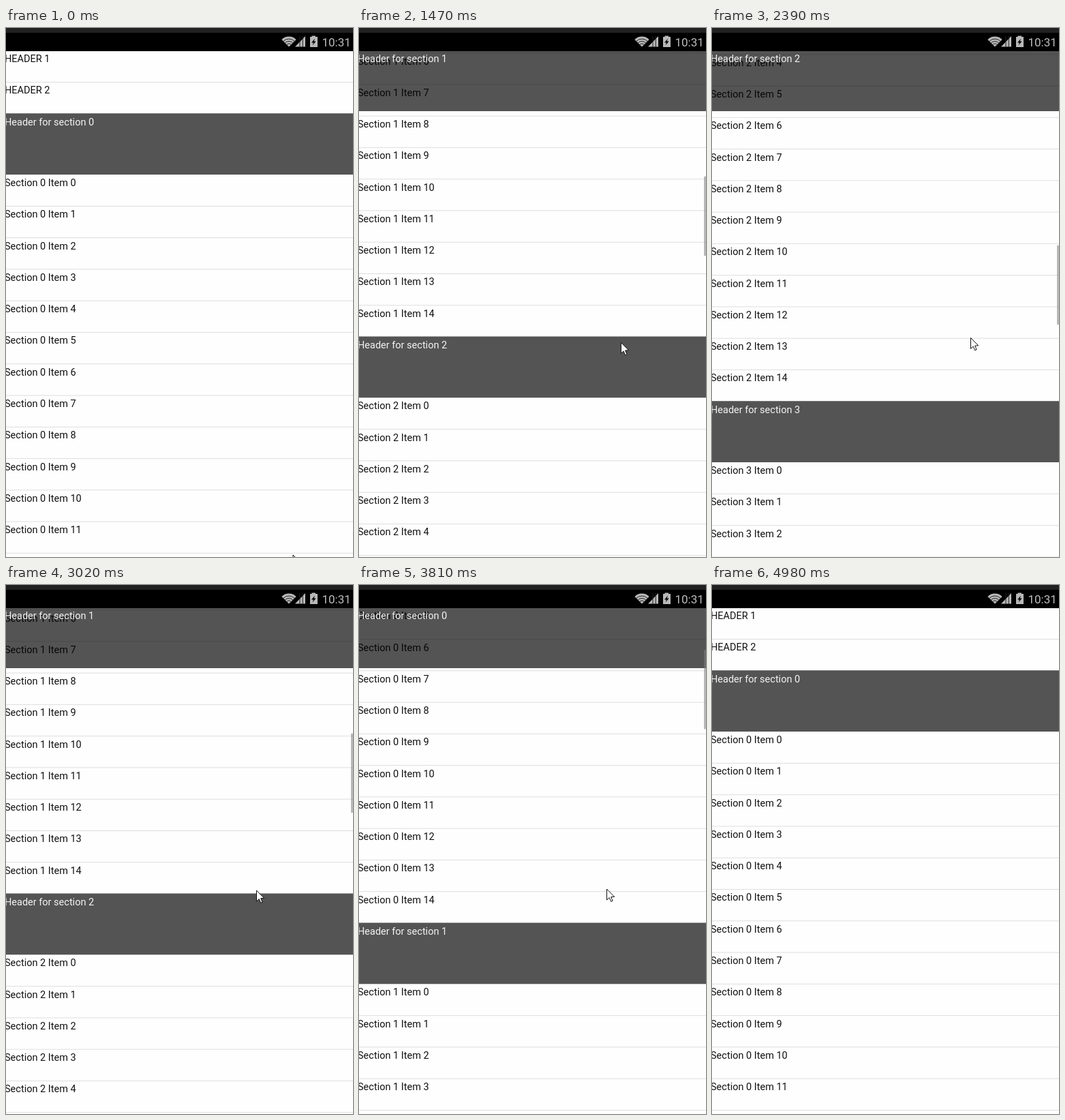
Animation of 509x776 px, one loop 5670 ms. Source, as an HTML page with a canvas:

```html
<!DOCTYPE html>
<html lang="en">
<head>
<meta charset="utf-8">
<title>Sticky section headers</title>
<style>
  html, body { margin: 0; width: 100%; height: 100%; overflow: hidden; background: #fff; }
  canvas { display: block; }
</style>
</head>
<body>
<canvas id="stage" width="509" height="776"></canvas>
<script>
const ctx = document.getElementById('stage').getContext('2d');
const W = 509, H = 776, LOOP = 5670;
const TOP = 33.5, ROW = 46.27, HEAD = 88.5, HEAD_STEP = 89.4, ITEMS = 15;
const FIRST = TOP + 2 * ROW;
const SECTION = HEAD_STEP + ITEMS * ROW;
const NOTCH = 137.74, TICK = 80;
const FADE_START = 4430, FADE_TIME = 250;

// Turns of the wheel: start, number of ticks, notch reached
const turns = [
  [750, 4, 4], [1080, 1, 8], [1400, 2, 10], [2010, 4, 16], [2310, 3, 13],
  [2630, 3, 10], [3020, 2, 8], [3340, 2, 5], [3720, 2, 3], [4040, 2, 0]
];

// Key points of the pointer tip: time, x, y
const path = [
  [0, 421, 773], [280, 391, 478], [670, 388.5, 466], [990, 388.5, 466], [1260, 385.5, 463],
  [2380, 379.5, 454.5], [3010, 367.5, 448], [3570, 363.5, 446], [4430, 363.5, 446], [4970, 421, 785]
];

const mix = (a, b, k) => a + (b - a) * k;
const clamp = k => Math.min(1, Math.max(0, k));

function notchAt(t) {
  let notch = 0;
  for (const [start, ticks, target] of turns) {
    if (t < start) break;
    const done = Math.floor((t - start) / TICK) + 1;
    notch = Math.round(mix(notch, target, clamp(done / ticks)));
  }
  return notch;
}

function pointerAt(time) {
  const t = Math.floor(time / 70) * 70;
  const i = path.findIndex(key => key[0] > t);
  if (i < 0) return path[path.length - 1].slice(1);
  const [t0, x0, y0] = path[i - 1], [t1, x1, y1] = path[i];
  const k = (t - t0) / (t1 - t0);
  return [mix(x0, x1, k), mix(y0, y1, k)];
}

function rect(x, y, w, h, color) {
  ctx.fillStyle = color;
  ctx.fillRect(x, y, w, h);
}

function shape(points, color) {
  ctx.beginPath();
  points.forEach(([x, y]) => ctx.lineTo(x, y));
  ctx.closePath();
  ctx.fillStyle = color;
  ctx.fill();
}

function label(text, top, color) {
  ctx.font = '14.5px Roboto, sans-serif';
  ctx.fillStyle = color;
  ctx.fillText(text, -2, top + 16.7);
}

function row(text, top, divided = true) {
  if (top > H || top + ROW < TOP) return;
  label(text, top, '#111');
  if (divided) rect(0, top + ROW - 0.8, W, 1, '#dedede');
}

function sectionHeader(section, top, height) {
  if (top > H || top + HEAD < 0) return;
  rect(0, top - 0.8, W, height + 0.8, 'rgba(0,0,0,0.667)');
  label('Header for section ' + section, top, '#f4f4f4');
}

function list(scroll) {
  row('HEADER 1', TOP - scroll);
  row('HEADER 2', TOP + ROW - scroll, false);
  let pinned = -1;
  for (let s = 0; s < 6; s++) {
    const top = FIRST + s * SECTION - scroll;
    if (top < TOP) pinned = s;
    else sectionHeader(s, top, HEAD + 0.5);
    for (let i = 0; i < ITEMS; i++) {
      row(`Section ${s} Item ${i}`, top + HEAD_STEP + i * ROW, i < ITEMS - 1);
    }
  }
  if (pinned >= 0) {
    const next = FIRST + (pinned + 1) * SECTION - scroll;
    sectionHeader(pinned, Math.min(TOP, next - HEAD), HEAD);
  }
}

// Row index, with fraction, at a distance from the top of the content
function rowIndex(y) {
  if (y < 2 * ROW) return y / ROW;
  const inner = y - 2 * ROW;
  const section = Math.floor(inner / SECTION);
  const rest = inner - section * SECTION;
  const part = rest < HEAD_STEP ? rest / HEAD_STEP : 1 + (rest - HEAD_STEP) / ROW;
  return 2 + section * (ITEMS + 1) + part;
}

function scrollbar(scroll, t) {
  if (t < turns[0][0]) return;
  const from = rowIndex(scroll), to = rowIndex(scroll + H - TOP);
  ctx.globalAlpha = 1 - clamp((t - FADE_START) / FADE_TIME);
  rect(506, 37 + 7.25 * from, 3, 7.7 * (to - from), 'rgba(127,127,127,0.55)');
  ctx.globalAlpha = 1;
}

function wifi(x, y, color) {
  const fan = r => ctx.arc(x, y, r, -Math.PI * 0.75, -Math.PI * 0.25);
  ctx.beginPath();
  ctx.moveTo(x, y);
  fan(15);
  ctx.fillStyle = color;
  ctx.fill();
  ctx.strokeStyle = '#222';
  ctx.lineWidth = 1;
  for (let r = 4.5; r < 15; r += 3.5) {
    ctx.beginPath();
    fan(r);
    ctx.stroke();
  }
}

function statusBar() {
  const grey = '#b9b9b9';
  rect(0, 0, W, 34, '#000');
  rect(0, 0, W, 7, '#212121');
  wifi(415, 27.5, grey);

  // signal
  shape([[424, 27.5], [439, 27.5], [439, 12]], grey);
  rect(430.5, 12, 1, 16, '#222');
  rect(434.7, 12, 1, 16, '#222');

  // charging battery
  rect(448.5, 11.5, 5.5, 3, grey);
  rect(446, 13, 11, 15, grey);
  shape([[453, 15.5], [448, 21.5], [451, 21.5], [449.5, 25.5], [454.7, 19.5], [451.7, 19.5]], '#000');

  ctx.font = '17px Roboto, sans-serif';
  ctx.fillStyle = '#bdbdbd';
  ctx.fillText('10:31', 463.5, 26.6);
}

function pointer(x, y) {
  ctx.save();
  ctx.translate(x, y);
  shape([[0, 0], [0, 16], [3.7, 12.6], [6.2, 18.3], [8.6, 17.3], [6.2, 11.6], [11.2, 11.4]], '#fff');
  ctx.strokeStyle = '#111';
  ctx.lineWidth = 1;
  ctx.stroke();
  ctx.restore();
}

function draw(t) {
  const scroll = notchAt(t) * NOTCH;
  rect(0, 0, W, H, '#fefefe');
  list(scroll);
  scrollbar(scroll, t);
  statusBar();
  pointer(...pointerAt(t));
}

const start = performance.now();
function tick() {
  draw((performance.now() - start) % LOOP);
  requestAnimationFrame(tick);
}
tick();
</script>
</body>
</html>
```
